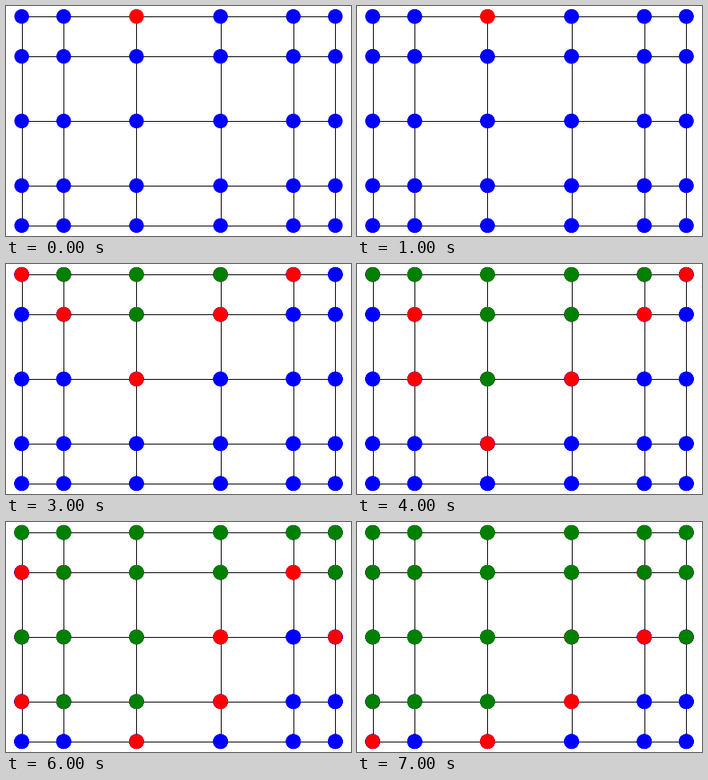
Animation, 432 px wide and 288 px high, one loop 8 s. Source, as a matplotlib script:

```python
import numpy as np
import matplotlib.pyplot as plt
from matplotlib.animation import FuncAnimation
from matplotlib.collections import LineCollection

COLS, ROWS, STEPS = 6, 5, 8
SEED = (0, 2)                                   # (row, column)
SLOW = {SEED, (1, 1), (1, 4), (2, 3), (3, 3), (4, 2)}
CLOSED = {(0, 0), (2, 5), (3, 1)}               # never pass it downwards

NODES = [(r, c) for r in range(ROWS) for c in range(COLS)]


def wait(node):
    """Steps a node stays red."""
    return 3 if node in SLOW else 1


def targets(node):
    r, c = node
    near = [(r, c - 1), (r, c + 1), (r - 1, c)]
    if node not in CLOSED:
        near.append((r + 1, c))
    return [n for n in near if n in NODES]


def spread_red():
    """Step at which each node turns red; one that turns green passes it on."""
    caught = {SEED: -1}
    for step in range(STEPS):
        done = [n for n, t in caught.items() if t + wait(n) == step]
        for node in done:
            for n in targets(node):
                caught.setdefault(n, step)
    return caught


def color(node, step):
    t = caught.get(node, STEPS)
    if step < t:
        return "blue"
    return "red" if step < t + wait(node) else "green"


def cosine_spaced(n):
    """Positions from -1 to 1, denser at the ends."""
    c = np.cos(np.pi * (np.arange(n) + 0.5) / n)
    return -c / c[0]


caught = spread_red()
xs, ys = cosine_spaced(COLS), -cosine_spaced(ROWS)

fig = plt.figure(figsize=(6, 4), dpi=72, facecolor="white")
ax = fig.add_axes([0, 0, 1, 1])
ax.set_xlim(-1.1, 1.1)
ax.set_ylim(-1.1, 1.1)
ax.axis("off")

edges = [[(xs[i], y), (xs[i + 1], y)] for y in ys for i in range(COLS - 1)]
edges += [[(x, ys[j]), (x, ys[j + 1])] for x in xs for j in range(ROWS - 1)]
ax.add_collection(LineCollection(edges, colors="black", linewidths=1, zorder=1))

# Each step paints over the previous ones, so soft rims build up.
px = [xs[c] for r, c in NODES]
py = [ys[r] for r, c in NODES]
layers = [ax.scatter(px, py, s=300, c=[color(n, k) for n in NODES],
                     linewidths=1, zorder=2 + k) for k in range(STEPS)]


def update(step):
    for k, layer in enumerate(layers):
        layer.set_visible(k <= step)
    return layers


anim = FuncAnimation(fig, update, frames=STEPS, interval=1000,
                     init_func=lambda: update(0), repeat=True, blit=False)
plt.show()
```
